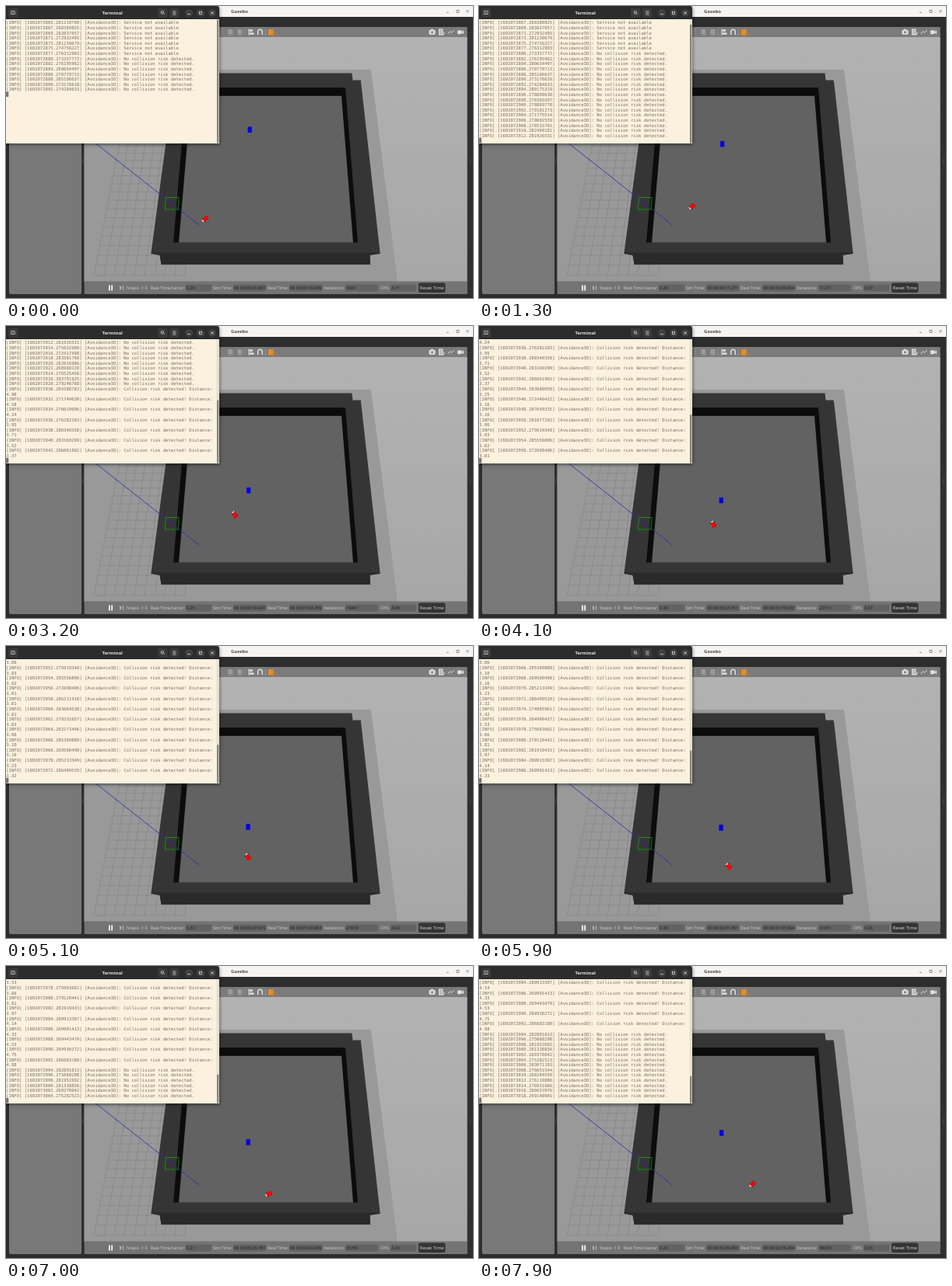
Animation, 600 px wide and 376 px high, one loop 8000 ms. Source, as an HTML page with a canvas:

```html
<!DOCTYPE html>
<html lang="en">
<head>
<meta charset="utf-8">
<title>Avoidance simulation</title>
<style>
html, body { margin: 0; width: 100%; height: 100%; overflow: hidden; background: #2d2d2d; }
canvas { display: block; width: 600px; height: 376px; }
</style>
</head>
<body>
<canvas id="stage"></canvas>
<script>
const W = 600, H = 376, LOOP = 8000, STEP = 100;
const canvas = document.getElementById('stage');
const scale = window.devicePixelRatio || 1;
canvas.width = W * scale;
canvas.height = H * scale;
const g = canvas.getContext('2d');

const SANS = '"Open Sans", "Noto Sans", sans-serif';
const MONO = '"DejaVu Sans Mono", "Liberation Mono", monospace';

// Repeatable noise in 0..1 for an integer seed.
function noise(seed) {
  const v = Math.sin(seed * 12.9898 + 4.1) * 43758.5453;
  return v - Math.floor(v);
}

// Distance to the obstacle for the k-th warning: a fast approach, then a slower retreat.
function distance(k) {
  const u = (k - 14.5) / (k < 14.5 ? 14.5 : 16.5);
  return 3.01 + 1.97 * Math.abs(u) ** (u < 0 ? 3.2 : 2);
}

const SERVICE_LINES = 7, WARNINGS = 32;
const log = Array.from({ length: 77 }, (_, i) => {
  const sec = 2865 + 2 * i + (i < SERVICE_LINES ? 0 : 1);
  const nano = Math.floor(268e6 + 2e7 * noise(sec));
  const head = `[INFO] [169207${sec}.${nano}] [Avoidance3D]: `;
  const k = (sec - 2930) / 2;
  if (i < SERVICE_LINES) return { sec, rows: [head + 'Service not available'] };
  if (k < 0 || k >= WARNINGS) return { sec, rows: [head + 'No collision risk detected.'] };
  return { sec, rows: [head + 'Collision risk detected! Distance:', distance(k).toFixed(2)] };
});

// Robot waypoints: seconds, x, y. The heading follows the path.
const PATH = [[0, 256, 274], [1.3, 274, 258], [2.5, 290, 242.5], [3.2, 294, 243],
  [5.1, 311, 271.5], [6.5, 329.5, 292], [7, 338, 293.5], [7.9, 351.5, 280.5]];

function along(path, t) {
  let i = 0;
  while (i < path.length - 2 && t >= path[i + 1][0]) i++;
  const a = path[i], b = path[i + 1], span = b[0] - a[0];
  const u = Math.min(1, (t - a[0]) / span);
  const slope = (j, c) => {
    const p = path[Math.max(0, j - 1)], q = path[Math.min(path.length - 1, j + 1)];
    return (q[c] - p[c]) / (q[0] - p[0]);
  };
  return [1, 2].map(c => {
    const d = b[c] - a[c], m = slope(i, c) * span, n = slope(i + 1, c) * span;
    return a[c] + u * (m + u * (3 * d - 2 * m - n + u * (m + n - 2 * d)));
  });
}

function box(x, y, w, h, fill, r = 0) {
  g.fillStyle = fill;
  g.beginPath();
  g.roundRect(x, y, w, h, r);
  g.fill();
}
function poly(fill, ...pts) {
  g.fillStyle = fill;
  g.beginPath();
  for (let i = 0; i < pts.length; i += 2) g.lineTo(pts[i], pts[i + 1]);
  g.fill();
}
function line(color, width, ...pts) {
  g.strokeStyle = color;
  g.lineWidth = width;
  g.beginPath();
  for (let i = 0; i < pts.length; i += 2) g.lineTo(pts[i], pts[i + 1]);
  g.stroke();
}
function cross(x, y, r, color, width) {
  line(color, width, x - r, y - r, x + r, y + r);
  line(color, width, x + r, y - r, x - r, y + r);
}
function frame(x, y, w, h, color, width = .8) {
  g.strokeStyle = color;
  g.lineWidth = width;
  g.strokeRect(x, y, w, h);
}
function ring(x, y, r, color, width = .9, from = 0, to = Math.PI * 2) {
  g.strokeStyle = color;
  g.lineWidth = width;
  g.beginPath();
  g.arc(x, y, r, from, to);
  g.stroke();
}
function disc(x, y, r, fill) {
  g.fillStyle = fill;
  g.beginPath();
  g.arc(x, y, r, 0, Math.PI * 2);
  g.fill();
}
function label(str, x, y, size, fill, align = 'left', weight = '') {
  g.font = `${weight} ${size}px ${SANS}`;
  g.textAlign = align;
  g.fillStyle = fill;
  g.fillText(str, x, y);
}

// Floor grid, its columns meeting at a vanishing point above the stage.
function drawGrid() {
  const vx = 347, vy = -873, top = 130, bottom = 347, color = 'rgba(112,112,112,.6)';
  const toward = (x, y) => vx + (x - vx) * (y - vy) / (bottom - vy);
  for (let x = 113; x < 240; x += 13) line(color, .6, x, bottom, toward(x, top), top);
  for (let y = bottom, gap = 13.2; y > top; y -= gap, gap *= .975)
    line(color, .6, toward(113, y), y, toward(230, y), y);
}

function drawScene(t) {
  const sky = g.createLinearGradient(0, 40, 0, 354);
  sky.addColorStop(0, '#b3b2b3');
  sky.addColorStop(1, '#a8a7a8');
  box(100.6, 40, 492.2, 315, sky);
  poly('#999999', 100.6, 82, 469, 82, 503, 355, 100.6, 355);
  drawGrid();

  // arena: wall top, front face, inner faces, floor
  poly('#363536', 217.4, 86.4, 444.5, 86.4, 445.5, 95.5, 455.8, 95.5, 480.6, 318, 467.5, 320,
    468, 332.8, 199.5, 332.8, 197.5, 320, 186.4, 318);
  poly('#2a292a', 186.4, 317.5, 480.6, 317.5, 480.6, 319, 467.5, 321, 468, 332.8,
    199.5, 332.8, 197.5, 321, 186.4, 319);
  poly('#0c0c0c', 232, 105, 436, 105, 452, 304.5, 215, 304.5);
  poly('#626262', 238, 115.7, 431, 115.7, 446, 304.5, 222, 304.5);

  line('#2828b0', .8, 100.6, 165.3, 248, 282);
  line('#12a012', .8, 205.5, 246.5, 222, 246.5, 221, 262, 204, 262, 205.5, 246.5);

  const swing = Math.cos(.45 * (t - 5.65));
  const ox = 312.2 - 1.2 * swing, oy = 193 + 41 * swing;
  box(ox - 2.6, oy - 3.7, 5.2, 7.4, '#0000ee');
  box(ox - 2.6, oy + 2.2, 5.2, 1.5, '#0000c4');

  const [rx, ry] = along(PATH, t);
  const [px, py] = along(PATH, Math.max(0, t - .05));
  const [qx, qy] = along(PATH, t + .05);
  g.save();
  g.translate(rx, ry);
  g.rotate(Math.atan2(qy - py, qx - px));
  box(-3.6, -2.9, 2, 5.8, '#2a2020');
  box(1.2, -2.8, 2, 5.6, '#3a1818');
  box(-4.6, -1.9, 1.8, 3.4, '#e6e6dc');
  poly('#f40808', -3.4, -2.3, 3, -2.4, 4.6, -.6, 4.4, 1.4, 3, 2.4, -3, 2.3);
  g.restore();
}

function clock(s) {
  const pad = (n, len) => String(Math.floor(n)).padStart(len, '0');
  return `00 00:${pad(s / 60, 2)}:${pad(s % 60, 2)}.${pad(s * 1000 % 1000, 3)}`;
}

function drawStatus(t) {
  const sim = 5.681 + 4.3 * t, real = 14.049 + 15.85 * t, tick = Math.round(t * 10);
  const ink = '#d0d0d0';
  box(100.6, 354.6, 492.2, 16.4, '#747474', 1);
  box(132, 359.5, 1.8, 7, '#f4f4f4');
  box(135.2, 359.5, 1.8, 7, '#f4f4f4');
  poly('#b4b4b4', 146, 360, 149, 363, 146, 366);
  box(150, 360, 1, 6, '#b4b4b4');
  label('Steps: 1', 155, 365.2, 6, ink);
  poly(ink, 178.5, 362.3, 181, 362.3, 179.8, 360.8);
  poly(ink, 178.5, 363.5, 181, 363.5, 179.8, 365);
  const fields = [
    ['Real Time Factor:', 231, 33, (.21 + .14 * noise(tick)).toFixed(2)],
    ['Sim Time:', 292, 42, clock(sim)],
    ['Real Time:', 364, 42, clock(real)],
    ['Iterations:', 436, 42, String(Math.floor(sim * 1000))],
    ['FPS:', 494, 33, (3.2 + 1.2 * noise(tick + 100)).toFixed(2)]
  ];
  for (const [name, x, w, value] of fields) {
    label(name, x - 1.3, 365.2, 5.5, ink, 'right');
    box(x, 358.5, w, 9, '#626262', 1);
    label(value, x + 1, 365.2, 5.5, '#1c1c1c');
  }
  box(530, 356.5, 34.5, 12.5, '#343434', 2);
  label('Reset Time', 547.2, 365.3, 6, '#dedede', 'center');
}

function drawToolbar() {
  const bar = '#7b7b7b', pale = '#dedede', rule = '#979797';
  box(100.6, 27, 492.2, 13, bar, 1);
  for (const x of [278, 307, 333.5]) line(rule, .8, x, 29, x, 38);
  for (const x of [285.5, 297.5]) {
    box(x, 30, 4.5, 6, '#999');
    frame(x + 1.5, 31.5, 4, 5.5, '#a8a8a8');
  }
  box(311.5, 29.5, 1.2, 8, pale);
  box(313, 30.3, 4, 2.5, pale);
  box(313, 34.3, 5.5, 2.5, pale);
  ring(326.5, 33, 2.8, pale, 1.5, Math.PI, 0);
  for (const x of [323.7, 329.3]) line(pale, 1.5, x, 33, x, 37);
  box(337, 30, 6.5, 7.5, '#f08a20', 1);
  box(343.5, 34, 4, 4, '#967a58');

  box(543.5, 31, 8, 5.8, pale, 1);
  box(545.8, 29.8, 3.2, 1.8, pale);
  disc(547.5, 33.8, 1.5, bar);
  box(556, 29.5, 5.5, 8, pale);
  for (let y = 31.5; y < 36; y += 2) line(bar, .7, 557, y, 560.5, y);
  line('#eee', 1, 561.5, 37.5, 563.5, 34);
  line(pale, 1, 567.5, 36, 570.5, 32.5, 572.5, 34.5, 575.5, 31);
  box(580, 31.2, 5.5, 5, pale, 1);
  poly(pale, 585, 33.7, 588, 31.2, 588, 36.2);
}

function drawSimulator(t) {
  box(0, 0, W, H, '#2d2d2d');
  box(200, 0, 400, 14, '#f6f5f4');
  label('Gazebo', 300, 9.1, 6, '#4a4a4a', 'center', 'bold');
  line('#666', .7, 566, 8.3, 569, 8.3);
  frame(579, 5.3, 3, 3, '#666', .7);
  cross(593, 6.8, 1.6, '#666', .7);

  drawToolbar();
  box(4, 27, 93, 344, '#787878', 2);
  drawScene(t);
  box(592.8, 27, 7.2, 344, '#303030');
  for (let y = 196; y < 204; y += 3) {
    disc(597, y, .6, '#777');
    disc(98.5, y, .6, '#777');
  }
  drawStatus(t);
}

function drawTerminal(t) {
  const rowH = 6.62, top = 18.1, now = 2892.75 + 15.9 * t;
  const rows = log.filter(e => e.sec <= now).flatMap(e => e.rows);
  const total = rows.length + 1, start = Math.max(0, total - 24);

  g.save();
  g.shadowColor = 'rgba(0,0,0,.6)';
  g.shadowBlur = 5 * scale;
  g.shadowOffsetY = scale;
  box(0, 0, 274, 177, '#2c2c2c', [3, 3, 0, 0]);
  g.restore();
  box(0, 17, 274, 160, '#fbf1de');

  const ink = '#e6e6e6', button = '#3b3b3b';
  label('Terminal', 136.7, 11.3, 6, ink, 'center', 'bold');
  for (const x of [3, 195, 210]) box(x, 3, 12.5, 11.5, button, 2);
  frame(6.8, 6.7, 4.4, 4, ink, .6);
  line(ink, .6, 9, 7.3, 9, 10);
  ring(200.8, 8.2, 1.7, ink, .8);
  line(ink, .8, 202.1, 9.5, 203.6, 11);
  for (let y = 7; y < 12; y += 2) line(ink, .7, 214, y, 218.5, y);
  for (const x of [235, 250, 265]) disc(x, 9, 5, '#414141');
  line(ink, .8, 233.4, 10.5, 236.6, 10.5);
  frame(248.5, 7.5, 3, 3, ink, .7);
  cross(265, 9, 1.6, ink, .8);

  g.font = `5.58px ${MONO}`;
  g.textAlign = 'left';
  g.fillStyle = '#747067';
  rows.slice(start).forEach((row, i) => g.fillText(row, .2, top + i * rowH + 5.2));
  box(0, top + (rows.length - start) * rowH - .4, 3.3, 6.5, '#77756f');

  const thumb = Math.min(159, 159 * 24 / total);
  box(270.5, 17, 3.5, 160, '#e6dfd2');
  box(271, 176.5 - thumb, 2.3, thumb, '#85817a', 1);
}

function render() {
  const t = Math.floor(performance.now() % LOOP / STEP) * STEP / 1000;
  g.setTransform(scale, 0, 0, scale, 0, 0);
  drawSimulator(t);
  drawTerminal(t);
  requestAnimationFrame(render);
}
render();
</script>
</body>
</html>
```
